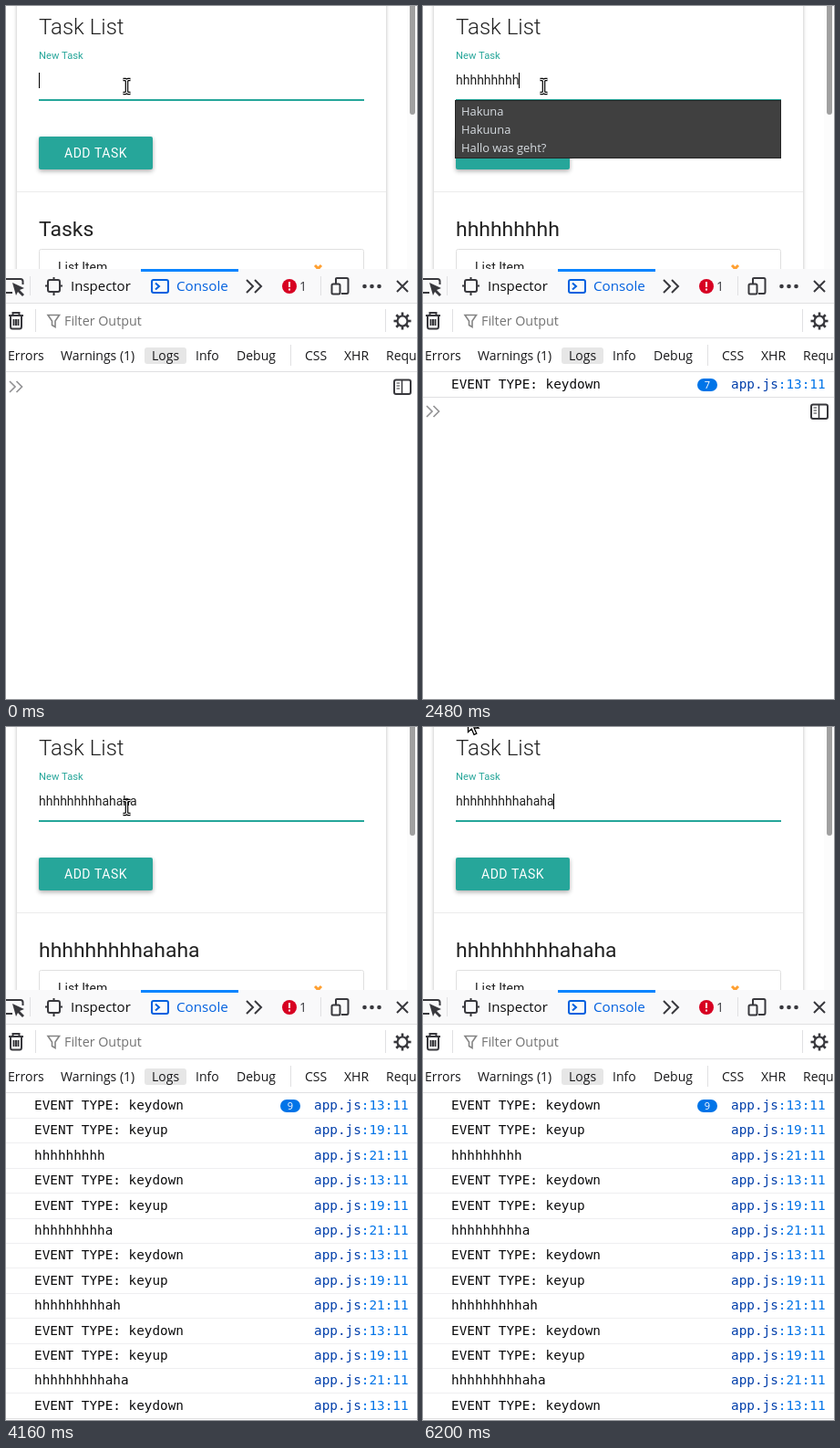
An HTML page with a canvas for the animation above (6.24 s loop, 451 by 759 pixels).

```html
<!DOCTYPE html>
<html lang="en">
<head>
<meta charset="utf-8">
<title>Task list keyboard events</title>
<style>
  html, body { margin: 0; width: 100%; height: 100%; overflow: hidden; background: #fff; }
  canvas { display: block; width: 451px; height: 759px; }
</style>
</head>
<body>
<canvas id="stage" width="451" height="759"></canvas>
<script>
const ctx = document.getElementById('stage').getContext('2d');
const LOOP = 6240, STEP = 40;
const TEAL = '#26a69a', DARK = '#38383d', BLUE = '#0060df', LINE = '#e0e0e2';
const ROBOTO = 'Roboto, sans-serif';
const UI = '"Open Sans", sans-serif';
const MONO = '14.33px "DejaVu Sans Mono", monospace';

// Typing: one time per letter for the field, and for the heading that follows it.
const TYPED = 'hhhhhhhhhahaha';
const REPEATS = [2200, 2240, 2320, 2320, 2360, 2440, 2440, 2480];
const FIELD_TIMES = [1720, ...REPEATS, 3160, 3440, 3680, 3920, 4120];
const HEADING_TIMES = [1760, ...REPEATS, 3200, 3480, 3720, 3960, 4160];
const CARET_TOGGLES = [520, 1720, 2920, 3160, 4160, 4880];

// Console: [time of keydown entry, time of keyup entries, letters typed].
const PRESSES = [[1760, 2600, 9], [3240, 3320, 10], [3480, 3600, 11], [3720, 3800, 12], [3960, LOOP, 13]];
const ROWS = PRESSES.flatMap(([down, up, n]) => [
  { time: down, text: 'EVENT TYPE: keydown', line: 13 },
  { time: up, text: 'EVENT TYPE: keyup', line: 19 },
  { time: up, text: TYPED.slice(0, n), line: 21 }
]);
const ROW_TOP = 401, ROW_HEIGHT = 27.4;

// Pointer path: [time, x, y].
const POINTER = [
  [4880, 132.5, 88], [5000, 100, 80], [5160, 45, 69], [5280, 9.5, 62.5], [5400, 26.5, 86.5],
  [5480, 48, 100], [5640, 70, 144], [5720, 79, 139], [5920, 76, 50], [6120, 55, -8], [6200, 49.5, -11]
];

const passed = (times, t) => times.filter(time => time <= t).length;

function text(str, x, y, font, color, align = 'left') {
  ctx.font = font;
  ctx.fillStyle = color;
  ctx.textAlign = align;
  ctx.fillText(str, x, y);
}

function rect(x, y, w, h, color) {
  ctx.fillStyle = color;
  ctx.fillRect(x, y, w, h);
}

function round(x, y, w, h, r, color) {
  ctx.beginPath();
  ctx.roundRect(x, y, w, h, r);
  ctx.fillStyle = color;
  ctx.fill();
}

function dot(x, y, r, color) {
  ctx.beginPath();
  ctx.arc(x, y, r, 0, 7);
  ctx.fillStyle = color;
  ctx.fill();
}

function stroke(d, color = DARK, width = 2) {
  ctx.strokeStyle = color;
  ctx.lineWidth = width;
  ctx.stroke(new Path2D(d));
}

function withShadow(color, blur, dy, draw) {
  ctx.save();
  ctx.shadowColor = color;
  ctx.shadowBlur = blur;
  ctx.shadowOffsetY = dy;
  draw();
  ctx.restore();
}

function drawPage(t) {
  withShadow('rgba(0,0,0,.28)', 4, 1, () => rect(12, -20, 405, 400, '#fff'));
  rect(440, 0, 11, 288, '#fcfcfc');
  round(443, -8, 6, 127, 3, '#a0a0a0');

  text('Task List', 36, 31, `300 24px ${ROBOTO}`, '#212121');
  text('New Task', 36, 58, `11.2px ${ROBOTO}`, TEAL);

  const value = TYPED.slice(0, passed(FIELD_TIMES, t));
  text(value, 36, 86, `14px ${ROBOTO}`, '#212121');
  if (passed(CARET_TOGGLES, t) % 2 === 0) {
    rect(Math.floor(36 + ctx.measureText(value).width), 73, 1, 17, '#000');
  }
  rect(36, 102, 357, 2, TEAL);

  withShadow('rgba(0,0,0,.32)', 5, 2, () => round(36, 143, 125, 36, 2, TEAL));
  ctx.letterSpacing = '0.5px';
  text('ADD TASK', 64, 166, `14px ${ROBOTO}`, '#fff');
  ctx.letterSpacing = '0px';
  rect(12, 203, 405, 1, '#ececec');

  const letters = passed(HEADING_TIMES, t);
  text(letters ? TYPED.slice(0, letters) : 'Tasks', 36, 252, `22.96px ${ROBOTO}`, '#212121');

  ctx.strokeStyle = '#e0e0e0';
  ctx.lineWidth = 1;
  ctx.beginPath();
  ctx.roundRect(36.5, 266.5, 356, 60, 2);
  ctx.stroke();
  text('List Item', 57, 291, `14px ${ROBOTO}`, '#212121');
  stroke('M339 284l7 7M346 284l-7 7', '#ffa032', 3);

  if (t >= 1800 && t < 2520) drawSuggestions();
}

function drawSuggestions() {
  rect(35, 103, 358, 64, '#252525');
  rect(36, 104, 356, 62, '#404040');
  ['Hakuna', 'Hakuuna', 'Hallo was geht?'].forEach((entry, i) =>
    text(entry, 42, 120 + 20 * i, `12.9px ${UI}`, '#d6dbe0'));
}

function drawGear(x, y) {
  ctx.save();
  ctx.translate(x, y);
  for (let i = 0; i < 8; i++) {
    ctx.rotate(Math.PI / 4);
    rect(-1.3, -9.5, 2.6, 4.5, DARK);
  }
  ctx.beginPath();
  ctx.arc(0, 0, 5.5, 0, 7);
  ctx.strokeStyle = DARK;
  ctx.lineWidth = 2.2;
  ctx.stroke();
  ctx.restore();
}

function drawTabs() {
  rect(0, 288, 451, 471, '#fff');
  rect(0, 288, 451, 37, '#f9f9fa');
  rect(0, 325, 451, 1, LINE);
  rect(148, 288, 107, 3, '#0a84ff');
  rect(26, 296, 1, 21, LINE);
  rect(345, 296, 1, 21, LINE);

  // Element picker
  stroke('M-2 299H16Q18.500 299 18.500 301.500V305M-2 314H7');
  ctx.fillStyle = DARK;
  ctx.fill(new Path2D('M7 303L20 309L15 311L20 316L18 318L13 313L11 317Z'));

  // Inspector
  stroke('M48 300H57Q59 300 59 302V311Q59 313 57 313H48Q46 313 46 311V302Q46 300 48 300ZM52.500 297V300M52.500 313V317M43 306.500H46M59 306.500H62');
  text('Inspector', 71, 312, `15px ${UI}`, '#0c0c0d');

  // Console
  stroke('M162 300H176Q178 300 178 302V312Q178 314 176 314H162Q160 314 160 312V302Q160 300 162 300ZM164 303.500L168 307L164 310.500', BLUE);
  text('Console', 187, 312, `15.2px ${UI}`, BLUE);

  stroke('M264 300L271 307L264 314M273 300L280 307L273 314');
  dot(311, 307, 8, '#d70022');
  rect(310, 302, 2, 6, '#fff');
  rect(310, 309.5, 2, 2, '#fff');
  text('1', 322, 312, `14px ${UI}`, '#38383d');

  // Responsive mode, menu, close
  stroke('M362 304V298.500Q362 298 363 298H374Q375.500 298 375.500 299.500V313Q375.500 315 374 315H368M359 304.500H365Q366.500 304.500 366.500 306V314Q366.500 315.500 365 315.500H359Q357.500 315.500 357.500 314V306Q357.500 304.500 359 304.500Z');
  [393.5, 401.5, 409.5].forEach(x => dot(x, 307, 2.3, DARK));
  stroke('M429 301L441 313M441 301L429 313');
}

function drawFilters() {
  rect(0, 363, 451, 1, LINE);
  rect(0, 400, 451, 1, LINE);
  rect(32, 332, 1, 25, LINE);
  rect(416, 332, 1, 25, LINE);
  rect(312, 371, 1, 23, LINE);

  // Trash can
  stroke('M3 339H19M7.500 338V336H14.500V338M5 340V351Q5 353.500 7 353.500H15Q17 353.500 17 351V340M8.500 343V350M11 343V350M13.500 343V350');
  stroke('M46 338.500H58.500L54 345V351.500L50.500 349.500V345Z', '#858585', 1.6);
  text('Filter Output', 64, 350, `14.3px ${UI}`, '#737373');
  drawGear(435, 345);

  round(152, 374, 46, 18, 3, '#e6e6e6');
  const labels = [['Errors', 2], ['Warnings (1)', 60], ['Logs', 160], ['Info', 208], ['Debug', 253],
    ['CSS', 328], ['XHR', 371], ['Requests', 417]];
  for (const [label, x] of labels) text(label, x, 388, `14px ${UI}`, '#18181a');
}

function keydownCount(t) {
  return t >= 2520 ? 9 : Math.max(1, passed(FIELD_TIMES, t) - 2);
}

function drawConsole(t) {
  const rows = ROWS.filter(row => row.time <= t);
  rows.forEach((row, i) => {
    const top = ROW_TOP + i * ROW_HEIGHT, base = Math.round(top + 18);
    text(row.text, 31, base, MONO, '#0c0c0d');
    text('app.js', 338, base, MONO, '#003eaa');
    text(`:${row.line}:11`, 338 + ctx.measureText('app.js').width, base, MONO, '#0074e8');
    const last = i === rows.length - 1;
    rect(0, Math.floor(top + ROW_HEIGHT), 451, 1, last ? LINE : '#efeff1');
  });

  const count = keydownCount(t);
  if (rows.length && count > 1) {
    round(301, 408, 22, 14, 7, '#0074e8');
    text(count, 312, 419, `11px ${UI}`, '#fff', 'center');
  }

  const y = Math.round(ROW_TOP + rows.length * ROW_HEIGHT + 15.6);
  ctx.save();
  ctx.translate(0, y);
  stroke('M4 -6L10 0L4 6M11.500 -6L17.500 0L11.500 6', '#939395', 1.7);
  stroke('M428 -7.500H442Q444 -7.500 444 -5.500V6Q444 8 442 8H428Q426 8 426 6V-5.500Q426 -7.500 428 -7.500Z');
  stroke('M434.500 -7V8', DARK, 1.5);
  stroke('M428.500 -4H432M428.500 -1H432M428.500 2H432', DARK, 1.2);
  ctx.restore();
}

function pointerAt(t) {
  if (t <= POINTER[0][0]) return POINTER[0].slice(1);
  const next = POINTER.findIndex(point => point[0] >= t);
  if (next < 0) return POINTER[POINTER.length - 1].slice(1);
  const [t0, x0, y0] = POINTER[next - 1], [t1, x1, y1] = POINTER[next];
  const k = (t - t0) / (t1 - t0);
  return [x0 + (x1 - x0) * k, y0 + (y1 - y0) * k];
}

function drawPointer(t) {
  const [x, y] = pointerAt(t);
  const overField = x >= 36 && y > 62 && y < 104;
  ctx.save();
  ctx.translate(x, y);
  if (overField) {
    const beam = 'M-4 -7.500H-1.500L0 -6.500L1.500 -7.500H4M0 -6.500V6.500M-4 7.500H-1.500L0 6.500L1.500 7.500H4';
    stroke(beam, '#000', 3.6);
    stroke(beam, '#fff', 1.2);
  } else {
    const arrow = 'M0 0V16.500L3.800 13L6.500 19.500L9.300 18.200L6.500 12H11.500Z';
    ctx.fillStyle = '#fff';
    ctx.fill(new Path2D(arrow));
    stroke(arrow, '#000', 1.3);
  }
  ctx.restore();
}

function draw(t) {
  rect(0, 0, 451, 759, '#fff');
  drawPage(t);
  drawTabs();
  drawFilters();
  drawConsole(t);
  drawPointer(t);
}

const start = performance.now();
function tick() {
  const t = (performance.now() - start) % LOOP;
  draw(Math.floor(t / STEP) * STEP);
  requestAnimationFrame(tick);
}
tick();
</script>
</body>
</html>
```
